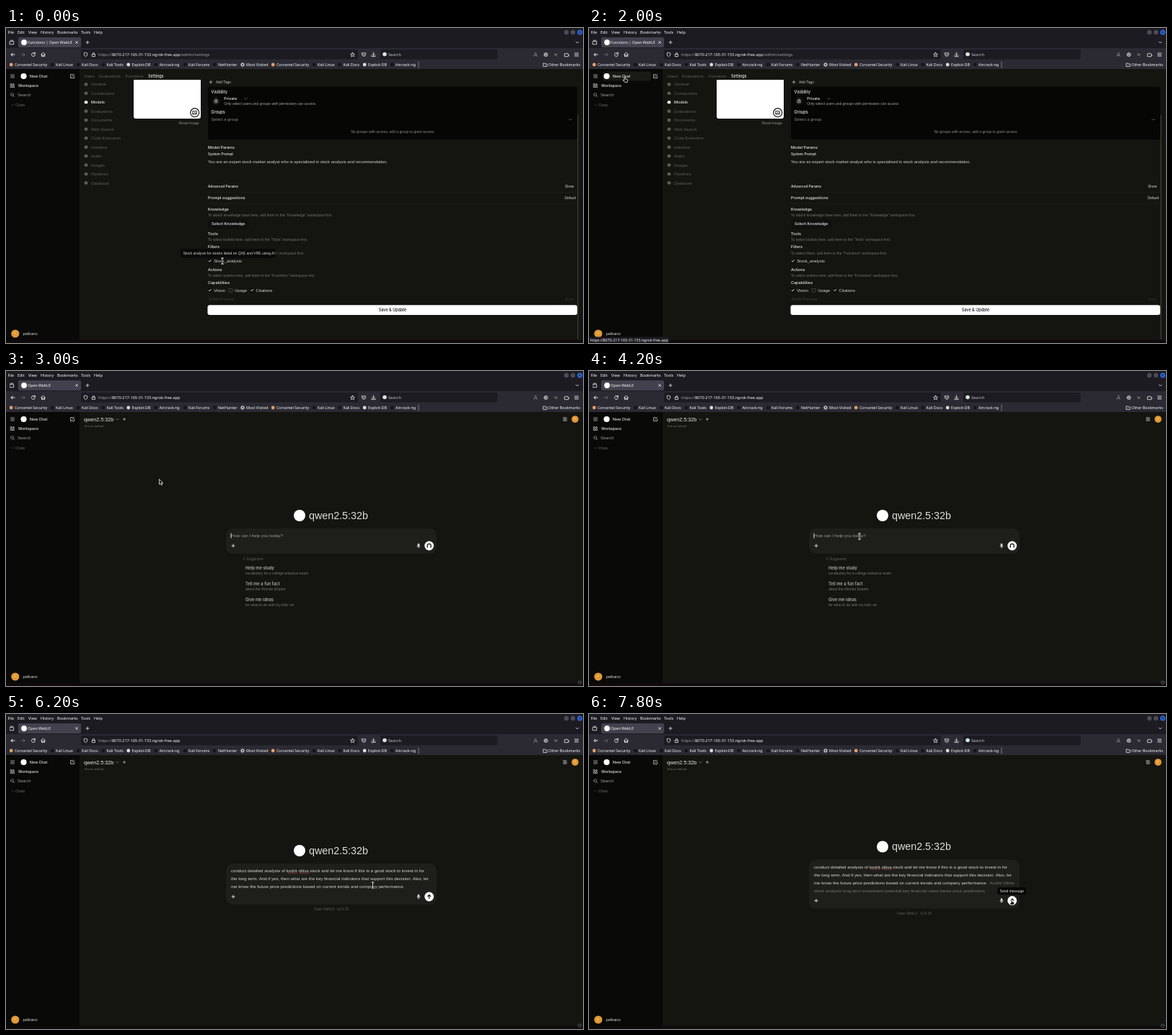
These frames come from a looping animation (800 px wide and 438 px high, 8000 ms). An HTML page:

```html
<!DOCTYPE html>
<html lang="en">
<head>
<meta charset="utf-8">
<title>Chat demo</title>
<style>
html, body { margin: 0; width: 100%; height: 100%; overflow: hidden; background: #141410; }
svg { display: block; width: 100vw; height: 100vh; }
text { white-space: pre; }
.ui { font-family: "Noto Sans", sans-serif; }
.web { font-family: "Liberation Sans", Arial, sans-serif; }
.med { font-family: Inter, sans-serif; font-weight: 500; }
</style>
</head>
<body>
<svg id="stage" viewBox="0 0 800 438"></svg>
<script>
const LOOP = 8000, STEP = 200;
const WHITE = '#ececea', GREY = '#8d8d89', DIM = '#5c5c58', FAINT = '#454541';
const HOST = '8070-217-165-31-153.ngrok-free.app';

// y is the middle of the line
const text = (x, y, s, size, fill, font = 'web', anchor = 'start') =>
  `<text class="${font}" x="${x}" y="${y + size * 0.35}" font-size="${size}" fill="${fill}" text-anchor="${anchor}">${s}</text>`;
const rect = (x, y, w, h, fill, r = 0) =>
  `<rect x="${x}" y="${y}" width="${w}" height="${h}" rx="${r}" fill="${fill}"/>`;
const dot = (x, y, r, fill) => `<circle cx="${x}" cy="${y}" r="${r}" fill="${fill}"/>`;
const icon = (x, y, d, color = WHITE, w = 0.8) =>
  `<path transform="translate(${x} ${y})" d="${d}" fill="none" stroke="${color}" stroke-width="${w}" stroke-linecap="round" stroke-linejoin="round"/>`;
const group = (id, body) => `<g id="${id}">${body}</g>`;

const PLUS = 'M-2 0h4M0-2v4', CROSS = 'M-1.5-1.5l3 3M1.5-1.5l-3 3', DOWN = 'M-1.8-.9L0 .9 1.8-.9';
const MENU = 'M-2.5-2h5M-2.5 0h5M-2.5 2h5', CHECK = 'M-1.5 0l1.1 1.2L1.6-1.4';
const RING = 'M-2.5 0a2.5 2.5 0 1 0 5 0a2.5 2.5 0 1 0-5 0';
const BOX = 'M-2.3-2.3h4.6v4.6h-4.6z';
const LOCK = 'M-1.9-.4h3.8v3h-3.8zM-1.2-.4v-1a1.2 1.2 0 0 1 2.4 0v1';

function chrome() {
  let s = rect(0, 0, 800, 28, '#1c1b22') + rect(0, 28, 800, 29, '#2b2a33');
  const menu = [[2.5, 'File'], [16, 'Edit'], [31, 'View'], [48, 'History'], [71, 'Bookmarks'], [104, 'Tools'], [122, 'Help']];
  s += menu.map(([x, m]) => text(x, 6, m, 5.4, '#fbfbfe', 'ui')).join('');
  s += dot(777, 6, 3.2, '#4a4b57') + dot(786, 6, 3.2, '#4a4b57') + dot(795.5, 6, 3.5, '#2d6be4') + icon(795.5, 6, CROSS, '#10131c');
  s += icon(8, 20, 'M-2.6-1.3h5.2v4h-5.2zM-1.8-2.8h3.6') + rect(17, 13, 87, 14, '#42414d', 2);
  s += dot(25, 20, 3.9, '#fff') + `<text id="tab" class="ui" x="30" y="21.9" font-size="5.3" fill="#fbfbfe"></text>`;
  s += icon(98, 20, CROSS) + icon(113, 20, PLUS) + icon(792, 20, DOWN);

  s += icon(9.5, 37, 'M2.5 0h-5M-.5-2l-2 2 2 2', WHITE, 1) + icon(23.5, 37, 'M-2.5 0h5M.5-2l2 2-2 2', '#72717b');
  s += icon(38, 37, 'M2-1.5a2.5 2.5 0 1 0 .4 2M2.3-3v2h-2', WHITE, 0.9) + icon(51.5, 37, 'M-3 0l3-2.8L3 0M-2-.6v3.2h1.4V.8h1.2v1.8H2V-.6', WHITE, 0.9);
  s += rect(104, 30, 384, 13.5, '#1c1b22', 2) + rect(519, 30, 162.5, 13.5, '#1c1b22', 2);
  s += icon(110.5, 37, 'M0-2.8l2.4.9c0 2.4-.7 3.8-2.4 4.8-1.7-1-2.4-2.4-2.4-4.8z') + icon(121.5, 37, LOCK);
  s += `<text class="ui" x="128" y="38.9" font-size="5.5" fill="#a4a3aa">https://<tspan fill="#fbfbfe">${HOST}</tspan><tspan id="path">/admin/settings</tspan></text>`;
  s += icon(480.5, 37, 'M0-2.8l.8 1.9 2.1.2-1.6 1.4.5 2.1L0 1.7l-1.8 1.1.5-2.1-1.6-1.4 2.1-.2z');
  s += icon(496, 37, 'M-2.5-2.2h5v2a2.5 2.5 0 0 1-5 0zM-1.2-.6L0 .6 1.2-.6') + icon(509.5, 37, 'M0-3v4M-1.7-.6L0 1l1.7-1.6M-2.5 1.2v1.4h5V1.2');
  s += dot(525, 36.5, 2.8, '#d9e2dc') + text(530, 37, 'Search', 5.7, '#c6c5cc', 'ui');
  s += icon(734, 37, 'M-1-2.3h2v2l1 2.6M-1-.3l-1 2.6M-1.4.8h2.8', GREY) + icon(748.5, 37, RING + 'M-1.5 1.6c.6-1.2 2.4-1.2 3 0M-.8-.6a.8.8 0 1 0 1.6 0a.8.8 0 1 0-1.6 0');
  s += icon(762.5, 37, 'M-2-1.5L0 0l2-1M0 0l1 2M-2 1L0 0', GREY) + icon(777, 37, 'M-2.3-1.2h1.5a.9.9 0 1 1 1.8 0h1.3v1.3a.9.9 0 1 1 0 1.6v1h-4.6z') + icon(791, 37, MENU);

  const team = ['Corvantel Security', '#e2a06a'], kali = n => ['Kali ' + n, '#14151b'];
  const edb = ['Exploit-DB', '#dcdcdc'], air = ['Aircrack-ng', '#14151b'];
  const marks = [[12, team], [69, kali('Linux')], [105, kali('Docs')], [139.5, kali('Tools')], [174.5, edb], [212.5, air], [253, kali('Forums')],
    [294, ['NetHunter', '#14151b']], [333, ['Most Visited']], [375, team], [432, kali('Linux')], [467.5, kali('Docs')], [502, edb], [540, air]];
  for (const [x, [name, color]] of marks) {
    s += color ? dot(x - 4.8, 51, 2.4, color) : icon(x - 5, 51, 'M-1.6 0a1.6 1.6 0 1 0 3.2 0a1.6 1.6 0 1 0-3.2 0M0-2.8v1M0 1.8v1M-2.8 0h1M1.8 0h1M-2-2l.7.7M2 2l-.7-.7M2-2l-.7.7M-2 2l.7-.7');
    s += text(x, 51, name, 5.3, '#fbfbfe', 'ui');
  }
  s += rect(571.6, 46.5, 0.8, 9, '#8f8e96') + icon(747.5, 51, 'M-2.6 2v-4h1.8l.8.9h2.6V2z') + text(752, 51, 'Other Bookmarks', 5.3, '#fbfbfe', 'ui');
  return s;
}

const avatar = (x, y, r) => dot(x, y, r, '#e29a35') + text(x, y, 'P', 3.6, '#f8e3c4', 'web', 'middle');

function sidebar() {
  return rect(0, 57, 102, 377, '#090907')
    + `<rect id="hover" x="19" y="60.5" width="67" height="13" rx="3" fill="#191916"/>`
    + icon(9, 67, MENU, '#c9c9c5', 0.7) + dot(24.5, 67, 4.1, '#fff') + text(33, 66.8, 'New Chat', 5.2, WHITE, 'med')
    + icon(92, 67, 'M.5-2.4h-3v5h5v-3M-.8.8L2.6-2.8', '#c9c9c5', 0.8)
    + icon(9, 80, 'M-2.5-2.5h1.9v1.9h-1.9zM.6.6h1.9v1.9H.6zM-2.5.6h1.9v1.9h-1.9zM1.5-2.6v2.2M.4-1.5h2.2', '#c9c9c5', 0.7) + text(17, 80, 'Workspace', 5.2, WHITE, 'med')
    + icon(9, 93, 'M-2.4-.4a2 2 0 1 0 4 0a2 2 0 1 0-4 0M1 1l1.6 1.6', '#a5a5a1', 0.7) + text(16, 93, 'Search', 5.8, '#a0a09c')
    + icon(9, 107, DOWN, DIM, 0.5) + text(13, 107, 'Chats', 5, '#6d6d69')
    + avatar(12.8, 425, 5.6) + text(23.5, 425, 'pelkano', 5.8, '#d4d4d0');
}

function settings() {
  let s = '';
  for (const [x, name] of [[108, 'Users'], [129, 'Evaluations'], [165.5, 'Functions']]) s += text(x, 67, name, 5.8, DIM);
  s += text(197, 67, 'Settings', 5.5, WHITE, 'med');
  const nav = 'General,Connections,Models,Evaluations,Documents,Web Search,Code Execution,Interface,Audio,Images,Pipelines,Database'.split(',');
  nav.forEach((name, i) => {
    const y = 78.3 + i * 12.47, on = i == 2;
    s += rect(108.7, y - 2.1, 4.6, 4.2, on ? WHITE : DIM, 1.3);
    s += text(118, y, name, on ? 5.4 : 5.8, on ? WHITE : DIM, on ? 'med' : 'web');
  });
  s += '<path d="M177 72h93v51a3 3 0 0 1-3 3h-87a3 3 0 0 1-3-3z" fill="#fff"/>';
  s += `<circle cx="261.7" cy="117.7" r="6" fill="#fff" stroke="#111" stroke-width="1.2"/>` + icon(261.7, 117.7, 'M-2.5-2.2h5v4.4h-5zM-2.4 1.8l1.8-2 1.2 1 1-.8 1 1', '#111', 0.9);
  s += text(239.5, 132.5, 'Reset Image', 5, GREY);
  s += icon(284, 75.2, PLUS, WHITE, 0.6) + text(291, 75.2, 'Add Tags', 5, '#c4c4c0');

  s += rect(280, 81.5, 512, 73.5, '#060605', 3);
  s += text(284.5, 89.2, 'Visibility', 5.5, WHITE, 'med') + dot(291.3, 101.5, 6.2, '#10100e') + icon(291.3, 101.3, LOCK + 'M0 .7v.6', '#d0d0cc', 0.7);
  s += text(302.3, 98.5, 'Private', 5.4, WHITE, 'med') + icon(332.5, 98.5, DOWN, GREY, 0.6);
  s += text(302.3, 105.3, 'Only select users and groups with permission can access', 5, '#a5a5a1');
  s += text(284.5, 117.3, 'Groups', 5.5, WHITE, 'med') + text(284.5, 127.3, 'Select a group', 5.8, GREY) + icon(782.5, 127.3, DOWN, GREY, 0.6);
  s += text(536, 144.2, 'No groups with access, add a group to grant access', 5, GREY, 'web', 'middle');

  s += text(280, 165.8, 'Model Params', 5.4, WHITE, 'med') + text(280, 175.8, 'System Prompt', 4.8, WHITE, 'med');
  s += text(280, 186, 'You are an expert stock market analyst who is specialized in stock analysis and recommendation.', 5.79, '#d6d6d2');
  s += text(280, 220.2, 'Advanced Params', 4.8, WHITE, 'med') + text(775, 220.2, 'Show', 4.9, '#d6d6d2') + rect(280, 228, 512, 0.5, '#242420');
  s += text(280, 236.3, 'Prompt suggestions', 5.4, WHITE, 'med') + text(774.5, 236.3, 'Default', 4.9, '#d6d6d2') + rect(280, 244, 512, 0.5, '#242420');

  const add = (what, where) => `To ${what}, add them to the "${where}" workspace first.`;
  const parts = [[251.8, 'Knowledge', add('attach knowledge base here', 'Knowledge')], [286, 'Tools', add('select toolkits here', 'Tools')],
    [304.5, 'Filters', add('select filters', 'Functions')], [335.8, 'Actions', add('select actions here', 'Functions')]];
  for (const [y, name, note] of parts) s += text(280, y, name, 5.4, WHITE, 'med') + text(280, y + 8.5, note, 5, '#72726e');
  s += rect(280, 266, 57, 13, '#10100e', 3) + text(285, 272.5, 'Select Knowledge', 5.4, WHITE, 'med');
  s += text(280, 354.5, 'Capabilities', 5.4, WHITE, 'med');
  for (const [x, y, name, on] of [[282.6, 324, 'Stock_analysis', 1], [282.6, 364.8, 'Vision', 1], [311.6, 364.8, 'Usage', 0], [341, 364.8, 'Citations', 1]]) {
    s += on ? rect(x - 2.5, y - 2.5, 5, 5, '#070706', 0.8) + icon(x, y, CHECK, '#fff', 0.9) : icon(x, y, BOX, '#5e5e5a', 0.6);
    s += text(x + 5.6, y, name, 5.8, '#d6d6d2');
  }
  s += text(280, 377, 'JSON Preview', 5.4, '#3a3a36', 'med') + text(775, 377, 'Show', 4.9, '#33332f');
  s += rect(279.5, 385.3, 512.5, 13.6, '#fff', 3) + text(536, 392, 'Save &amp; Update', 5.5, '#111', 'med', 'middle');
  s += rect(792.5, 121, 0.9, 312, '#50504a');
  return s + group('filterTip', rect(242, 307, 132, 13, '#0a0a09', 3) + text(245.5, 313.3, 'Stock analysis for stocks listed on QXE and VRE using AI', 5, '#d6d6d2'));
}

const ideas = [['Help me study', 'vocabulary for a college entrance exam'], ['Tell me a fun fact', 'about the Roman Empire'], ['Give me ideas', "for what to do with my kids' art"]];
const prompt = ['conduct detailed analysis of kodrit oltiva stock and let me know if this is a good stock to invest in for',
  'the long term. And if yes, then what are the key financial indicators that support this decision. Also, let',
  'me know the future price predictions based on current trends and company performance.'];
const wave = (x, w) => `M${x} 222` + 'q.5-.8 1 0t1 0'.repeat(w / 2);

function chat() {
  let s = text(108, 67, 'qwen2.5:32b', 7.2, WHITE) + icon(154.5, 67.3, DOWN, GREY, 0.7) + icon(164, 67, 'M-1.6 0h3.2M0-1.6v3.2', '#c9c9c5', 0.7);
  s += text(108.5, 76, 'Set as default', 4.4, '#73736f');
  s += icon(775, 67, 'M-2.6-2h2M.6-2h2M-2.6 0h3.4M2 0h.6M-2.6 2h1.4M.2 2h2.4M-.6-2.6v1.2M.8-.6v1.2M-.2 1.4v1.2', '#c9c9c5', 0.7) + avatar(789, 67, 4.8);
  s += icon(795.5, 433.3, RING, '#6a6a66', 0.6) + text(795.5, 433.3, '?', 4, '#a0a09c', 'web', 'middle');
  s += `<rect id="field" x="305" width="292" rx="9" fill="#1e1f1b"/>`;
  s += group('top', dot(407, 201, 8, '#fff') + text(420, 200.5, 'qwen2.5:32b', 14.3, '#dededa')
    + group('hint', text(312, 229.2, 'How can I help you today?', 6.12, '#9a9a96'))
    + group('typed', prompt.map((p, i) => text(312, 229.2 + i * 11, p, 6.12, '#d8d8d4')).join('')
      + `<path d="${wave(390, 14)}${wave(406.5, 14)}" transform="translate(0 10.2)" fill="none" stroke="#d05a5a" stroke-width=".6"/>`)
    + group('ghost', text(556, 251.2, 'Kodrit Oltiva', 6.12, '#74746f') + text(312, 262, 'stock analysis long term investment potential key financial ratios future price predictions.', 6.12, '#74746f'))
    + `<rect id="caret" width=".8" height="7.4" fill="#fff"/>`);
  s += group('bottom', icon(315, 243, PLUS, WHITE, 0.9) + rect(570.7, 239.7, 2.6, 4.4, '#d8d8d4', 1.3) + icon(572, 243, 'M-2 0a2 2 0 0 0 4 0M0 2v1.2', '#d8d8d4', 0.7) + dot(586.7, 243, 6.4, '#fff')
    + group('call', icon(586.7, 243, 'M-2.6 1.5V0a2.6 2.6 0 0 1 5.2 0v1.5M-2.2.8v1.4M2.2.8v1.4', '#111', 1.1))
    + group('send', icon(586.7, 243, 'M0 2.6v-5M-2.1-.4L0-2.5 2.1-.4', '#111', 1.1) + text(451, 260.5, 'Open WebUI ‧ v0.5.20', 4.9, DIM, 'web', 'middle')));
  s += group('ideas', icon(330, 261, 'M.5-2l-1.8 2.2h2.4L-.6 2', DIM, 0.5) + text(333, 261, 'Suggested', 4.9, DIM)
    + ideas.map(([a, b], i) => group('idea' + i, text(332, 0, a, 5.8, '#c0c0bc', 'med') + text(332, 7.7, b, 5, '#777773'))).join(''));
  return s + group('sendTip', rect(566.5, 241, 39.5, 10.3, '#060605', 2) + text(586.3, 246.2, 'Send message', 5, '#e4e4e0', 'web', 'middle'));
}

const status = rect(0, 429.5, 111, 8.5, '#1c1b22', 1) + text(1.5, 433.8, 'https://' + HOST, 5.25, '#fbfbfe', 'ui');
const BEAM = 'M-1.6-4h3.2M0-4v8M-1.6 4h3.2';
const outlined = (id, d) => group(id, `<path d="${d}" fill="#0c0c0c" stroke="#f4f4f4" stroke-width=".8" stroke-linejoin="round"/>`);
const cursor = group('beam', icon(0, 0, BEAM, '#0c0c0c', 2) + icon(0, 0, BEAM, '#f4f4f4', 0.9))
  + outlined('hand', 'M-1-2.6q.7-.9 1.4 0v2.4l2.6.6q.8.4.6 1.4l-.6 2.6h-3.6l-2.2-2.7q0-1.2 1.8.2z')
  + outlined('arrow', 'M0 0v7.2l1.7-1.5 1.2 2.5 1.2-.6-1.2-2.4h2.3z');

const stage = document.getElementById('stage');
stage.innerHTML = rect(0, 0, 800, 438, '#141410') + rect(0, 434, 800, 4, '#0f090b') + sidebar()
  + group('settings', settings()) + group('chat', chat()) + chrome() + group('status', status) + group('cursor', cursor);

const $ = {};
stage.querySelectorAll('[id]').forEach(el => $[el.id] = el);
const show = (id, o) => $[id].setAttribute('opacity', +o);
const move = (id, x, y) => $[id].setAttribute('transform', `translate(${x} ${y})`);

// time, x, y
const route = [[0, 300, 324], [400, 300, 324], [1600, 50, 71], [2400, 50, 71], [3600, 375, 230], [4200, 375, 230],
  [5000, 462, 226], [5800, 462, 226], [6600, 555, 250], [6800, 555, 250], [7600, 586, 261]];

function pointer(t) {
  const i = route.findIndex(k => k[0] > t);
  if (i < 0) return route.at(-1).slice(1);
  const [t0, x0, y0] = route[i - 1], [t1, x1, y1] = route[i];
  const p = (t - t0) / (t1 - t0), e = p * p * (3 - 2 * p);
  return [x0 + (x1 - x0) * e, y0 + (y1 - y0) * e];
}

function render(t) {
  const inChat = t >= 2200, loaded = t >= 2400, typed = t >= 4400, ghost = t >= 6400;
  const lines = ghost ? 4 : typed ? 3 : 1, shift = 5.5 * (lines - 1);
  const [x, y] = pointer(t);

  show('settings', !inChat);
  show('chat', inChat);
  $.tab.textContent = (loaded ? '' : 'Functions | ') + 'Open WebUI';
  show('path', !inChat);
  show('filterTip', t < 600);
  show('hover', t >= 1600 && t < 2600);
  show('status', t < 1600 || loaded ? 0 : inChat ? 0.5 : 1);

  move('top', 0, -shift);
  move('bottom', 0, shift);
  $.field.setAttribute('y', 219 - shift);
  $.field.setAttribute('height', 35 + 2 * shift);
  show('hint', !typed);
  show('typed', typed);
  show('ghost', ghost);
  show('call', !typed);
  show('send', typed);
  show('caret', (t - (typed ? 4300 : 2800) + 1000) % 1000 < 500 && t >= 2800);
  move('caret', typed ? 555.2 : 311.6, typed ? 247.4 : 225.4);
  show('sendTip', t < 7600 ? 0 : t < 7800 ? 0.6 : 1);

  show('ideas', !typed);
  ideas.forEach((_, i) => {
    const slot = loaded ? i : (i + 2) % 3;
    const p = loaded ? 1 : Math.max(0, 0.85 - 0.45 * slot);
    show('idea' + i, p);
    move('idea' + i, 0, 273.5 + 22 * slot + 10 * (1 - p));
  });

  const hand = t >= 1400 && t < 2600 || t >= 7400;
  const beam = !hand && (t < 600 || t >= 3400);
  move('cursor', x, y);
  show('hand', hand);
  show('beam', beam);
  show('arrow', !hand && !beam);
}

function tick() {
  render(Math.floor(performance.now() % LOOP / STEP) * STEP);
  requestAnimationFrame(tick);
}
tick();
</script>
</body>
</html>
```
